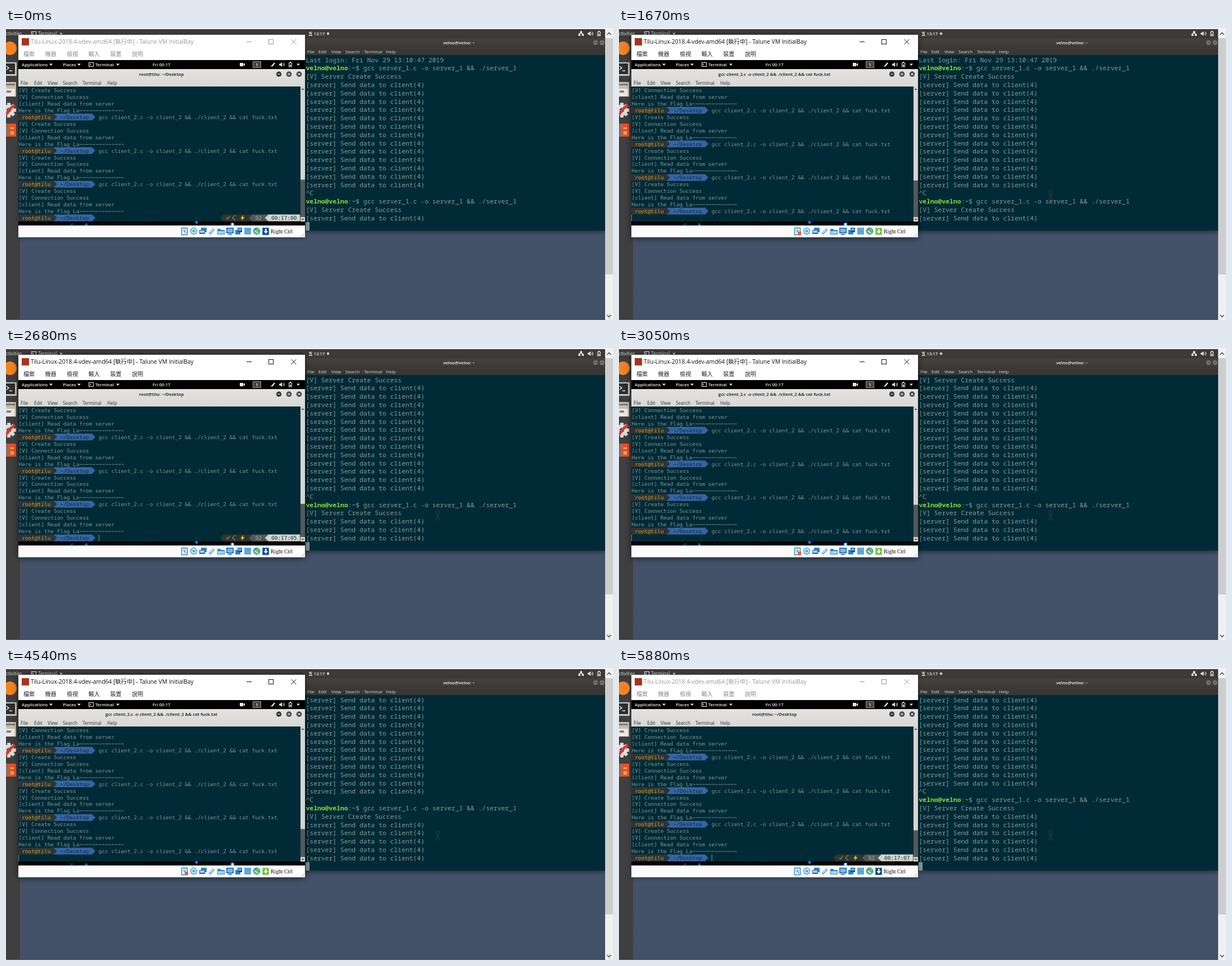
Animation, 1080 px wide and 519 px high, one loop 5.96 s. Source, as an HTML page with a canvas:

```html
<!DOCTYPE html>
<html lang="zh-Hant">
<head>
<meta charset="utf-8">
<title>Two terminals</title>
<style>
html, body { margin: 0; width: 100%; height: 100%; overflow: hidden; background: #435268; }
canvas { display: block; }
</style>
</head>
<body>
<canvas id="stage" width="1080" height="519"></canvas>
<script>
const c = document.getElementById('stage').getContext('2d');
const LOOP = 5960;
const SANS = '"Open Sans", "Noto Sans", "Noto Sans CJK TC", sans-serif';
const CJK = '"Open Sans", "Noto Sans CJK TC", "Noto Sans CJK", sans-serif';
const LEFT_MONO = '9.45px "DejaVu Sans Mono", monospace';
const RIGHT_MONO = '11.37px "Noto Sans Mono", monospace';
const COL = 5.69, ROW = 11.95, BASE = '#002b36', GREY = '#839496';
const COMMAND = 'gcc client_2.c -o client_2 && ./client_2 && cat fuck.txt';
const OUTPUT = ['[V] Create Success', '[V] Connection Success',
  '[client] Read data from server', 'Here is the Flag La~~~~~~~~~~~~~~'];
const SEND = '[server] Send data to client(4)';

// Each run: command recalled, title changed, enter pressed, server replied, prompt back, clock second.
const RUNS = [
  { up: 1270, title: 1590, enter: 1590, reply: 1900, done: 1980, sec: 4 },
  { up: 2130, title: 2360, enter: 2360, reply: 2450, done: 2560, sec: 5 },
  { up: 2760, title: 2900, enter: 2900, reply: 3210, done: 3290, sec: 5 },
  { up: 3370, title: 3680, enter: 3680, reply: 4000, done: 4080, sec: 6 },
  { up: 4160, title: 4310, enter: 4540, reply: 4680, done: 4780, sec: 7 }
];

function rect(x, y, w, h, color) { c.fillStyle = color; c.fillRect(x, y, w, h); }

function frame(x, y, w, h, color, width = 1) {
  c.strokeStyle = color; c.lineWidth = width; c.strokeRect(x, y, w, h);
}

function dot(x, y, r, color) {
  c.fillStyle = color; c.beginPath(); c.arc(x, y, r, 0, 7); c.fill();
}

function shape(color, ...p) {
  c.fillStyle = color; c.beginPath();
  for (let i = 0; i < p.length; i += 2) c.lineTo(p[i], p[i + 1]);
  c.fill();
}

function line(color, width, ...p) {
  c.strokeStyle = color; c.lineWidth = width; c.beginPath();
  for (let i = 0; i < p.length; i += 2) c.lineTo(p[i], p[i + 1]);
  c.stroke();
}

function text(s, x, y, font, color, align = 'left') {
  c.font = font; c.fillStyle = color; c.textAlign = align; c.fillText(s, x, y);
}

function fade(x, y, w, h, from, to) {
  const g = c.createLinearGradient(0, y, 0, y + h);
  g.addColorStop(0, from); g.addColorStop(1, to);
  rect(x, y, w, h, g);
}

function caret(x, y, color, s = 3) { shape(color, x - s, y - s / 2, x + s, y - s / 2, x, y + s / 2 + .5); }

function speaker(x, y) {
  shape('#eee', x - 5, y - 1.5, x - 3, y - 1.5, x, y - 4, x, y + 4, x - 3, y + 1.5, x - 5, y + 1.5);
  c.strokeStyle = '#eee'; c.lineWidth = 1;
  for (const r of [2.5, 4.5]) { c.beginPath(); c.arc(x, y, r, -.9, .9); c.stroke(); }
}

function battery(x, y) {
  frame(x - 2.5, y - 3, 5, 7, '#eee'); rect(x - 1, y - 5, 2, 2, '#eee'); rect(x - 1, y, 2, 3, '#eee');
}

function termIcon(x, y) {
  frame(x - 3.5, y - 3.5, 8, 7, '#eee'); line('#eee', 1, x - 2, y - 1.5, x, y, x - 2, y + 1.5);
}

function drawDesktop() {
  fade(0, 0, 1066, 519, '#46566c', '#425167');
  rect(0, 18, 25, 501, '#3f3f41');
  rect(0, 2, 1066, 17, '#3c3b38');
  rect(0, 0, 1080, 2, '#f4f4f4');
  text('ctivities', 0, 13, '8.2px ' + SANS, '#ddd');
  termIcon(49, 10);
  text('Terminal', 57, 13, '8.2px ' + SANS, '#ddd');
  caret(98, 10, '#ddd', 2.5);
  text('五 13:17', 538, 13, '600 7.6px ' + CJK, '#eee');
  dot(573, 10, 2.3, '#ccc');
  for (const [x, y] of [[1023, 7], [1020, 12], [1026, 12]]) rect(x - 1.5, y - 1.5, 3.5, 3.5, '#eee');
  line('#eee', 1, 1020, 11, 1020, 9.5, 1026, 9.5, 1026, 11);
  speaker(1040, 10); battery(1055, 10);
  drawDock();
}

function drawDock() {
  dot(7, 36, 12, '#f58220');
  rect(-2, 61, 21, 24, '#c9c9c7'); rect(-2, 63, 18, 19, '#2d2d2d');
  line('#fff', 1.4, 1, 68, 5, 71, 1, 74); line('#fff', 1.4, 6, 76, 11, 76);
  rect(-2, 96, 20, 26, '#c5beb3'); rect(-2, 99, 18, 3, '#83796e');
  rect(-2, 108, 18, 13, '#eeeae3'); rect(1, 111, 8, 4, '#8a8178');
  c.save(); c.translate(5, 146);
  for (let i = 0; i < 8; i++) { c.rotate(Math.PI / 4); rect(-3, -13, 6, 8, '#d9d9d9'); }
  c.restore();
  dot(5, 146, 10, '#dedede'); dot(5, 146, 4, '#5a5a5a');
  line('#d83b2f', 5, 0, 154, 9, 142, 16, 137);
  rect(-2, 170, 20, 23, '#e95420'); rect(-2, 171, 6, 21, '#777470');
  line('#fff', 1.2, 8, 178, 14, 178); line('#fff', 1.2, 8, 185, 14, 185); line('#fff', 1.2, 8, 188, 14, 188);
}

function drawPageBar() {
  rect(1066, 2, 14, 517, '#f0f0f0');
  rect(1066, 18, 14, 420, '#cdcdcd');
  line('#555', 1.6, 1069.5, 12, 1073, 8.5, 1076.5, 12);
  line('#555', 1.6, 1069.5, 510, 1073, 513.5, 1076.5, 510);
  rect(0, 518, 1066, 1, '#536176');
}

function serverPrompt(x, y) {
  const bold = 'bold ' + RIGHT_MONO, w = 6.823;
  text('velno@velno', x, y, bold, '#8ae234');
  text(':', x + 11 * w, y, RIGHT_MONO, GREY);
  text('~', x + 12 * w, y, bold, '#729fcf');
  text('$ gcc server_1.c -o server_1 && ./server_1', x + 13 * w, y, RIGHT_MONO, '#8b9a9b');
}

function drawServer(t) {
  const replies = RUNS.filter(r => t >= r.reply);
  c.save();
  c.shadowColor = 'rgba(0,0,0,.5)'; c.shadowBlur = 8; c.shadowOffsetY = 2;
  rect(528, 20, 538, 340, BASE);
  c.restore();
  fade(528, 18, 538, 18, '#44433f', '#3a3935');
  rect(528, 36, 538, 12, '#393834');
  text('velno@velno: ~', 806, 29, 'bold 7.5px ' + SANS, '#dfdbd2', 'center');
  for (const x of [1049, 1060.5]) { dot(x, 26, 4.2, '#777570'); line('#383733', 1, x - 2, 26, x + 2, 26); }
  const names = [['File', 536], ['Edit', 556], ['View', 579], ['Search', 604], ['Terminal', 637], ['Help', 676]];
  for (const [s, x] of names) text(s, x, 45, '8px ' + SANS, '#dfdbd2');

  const rows = ['Last login: Fri Nov 29 13:10:47 2019', null, '[V] Server Create Success',
    ...Array(13).fill(SEND), '^C', null, '[V] Server Create Success', ...Array(1 + replies.length).fill(SEND)];
  rows.slice(-20).forEach((s, i) => {
    const y = 60.6 + i * 14.8;
    if (s === null) serverPrompt(533.5, y);
    else text(s, 533.5, y, RIGHT_MONO, '#8b9a9b');
  });
  const since = replies.length ? replies[replies.length - 1].reply : -230;
  if (Math.floor((t - since) / 600) % 2 === 0) rect(533, 345, 7, 15, '#839496');
  if (t >= 410) drawGhost();
}

function drawGhost() {
  const color = '#26383e';
  frame(764.5, 290, 7, 4, color);
  line(color, 1.3, 763, 298, 773, 298);
  line(color, 1.3, 768, 294, 768, 305);
  line(color, 1.2, 764, 307, 766, 301); line(color, 1.2, 772, 307, 770, 301);
}

function drawFrame(active) {
  c.save();
  c.shadowColor = active ? 'rgba(0,0,0,.55)' : 'rgba(0,0,0,.3)';
  c.shadowBlur = active ? 11 : 7; c.shadowOffsetY = 2;
  rect(22, 12, 510, 360, '#fff');
  c.restore();
  const ink = active ? '#111' : '#999';
  rect(28, 18, 13, 13, '#a8341f');
  text('Tilu-Linux-2018.4-vdev-amd64 [執行中] - Talune VM InitialBay', 44, 28, '10.3px ' + CJK, ink);
  line(ink, 1, 428, 24.5, 437, 24.5);
  frame(467.5, 20.5, 8, 8, ink);
  line(ink, 1, 507.5, 20, 516.5, 29); line(ink, 1, 516.5, 20, 507.5, 29);
  ['檔案', '機器', '檢視', '輸入', '裝置', '說明'].forEach((s, i) =>
    text(s, 31 + i * 38.6, 50, '10px "Noto Sans CJK TC", "Noto Sans CJK", sans-serif', active ? '#222' : '#888'));
}

function drawPanel(title) {
  rect(22, 57, 510, 16, '#000');
  const font = '600 7.8px ' + SANS;
  text('Applications', 28, 68, font, '#eee'); caret(80, 65, '#eee');
  text('Places', 101, 68, font, '#eee'); caret(130, 65, '#eee');
  termIcon(151, 65);
  text('Terminal', 159, 68, font, '#eee'); caret(199, 65, '#eee');
  text('Fri 00:17', 276.5, 68, font, '#eee', 'center');
  rect(416, 62, 6, 6, '#eee'); shape('#eee', 422, 65, 425, 62, 425, 68);
  rect(439, 59, 15, 12, '#444'); frame(439.5, 59.5, 14, 11, '#999');
  text('1', 446.5, 68, font, '#fff', 'center');
  line('#eee', 2.2, 473, 68, 478, 62); line('#eee', 1, 471, 69, 473, 67);
  speaker(491, 65); battery(506, 65); caret(520, 65, '#eee');

  fade(22, 73, 510, 31, '#e3e2e0', '#dad8d5');
  text(title, 276.5, 85, 'bold 7.7px ' + SANS, '#303436', 'center');
  [485.5, 503.5, 521.5].forEach((x, i) => {
    dot(x, 82, 4.7, '#34383a');
    if (i === 0) line('#eee', 1.2, x - 2, 82, x + 2, 82);
    if (i === 1) frame(x - 1.5, 80.5, 3, 3, '#eee');
    if (i === 2) { line('#eee', 1.1, x - 2, 80, x + 2, 84); line('#eee', 1.1, x + 2, 80, x - 2, 84); }
  });
  const names = [['File', 26], ['Edit', 50], ['View', 74], ['Search', 101], ['Terminal', 136], ['Help', 180]];
  for (const [s, x] of names) text(s, x, 101, '8.3px ' + SANS, '#303436');
}

const col = n => 22.5 + n * COL;

function clientPrompt(y, command) {
  const top = y - 9.6, mid = top + ROW / 2, end = top + ROW;
  rect(22, top, col(11) - 22, ROW, '#2e3436');
  rect(col(11), top, col(23) - col(11), ROW, '#3465a4');
  shape('#2e3436', col(11) - .5, top, col(12), mid, col(11) - .5, end);
  shape('#3465a4', col(23) - .5, top, col(24), mid, col(23) - .5, end);
  text('root@tilu', col(1), y, LEFT_MONO, '#d0a020');
  text('~/Desktop', col(13), y, LEFT_MONO, '#16283c');
  if (command) text(COMMAND, col(25), y, LEFT_MONO, GREY);
}

function statusPrompt(y, sec) {
  const top = y - 9.6, mid = top + ROW / 2, end = top + ROW;
  const segment = (from, to, color) => {
    rect(col(from), top, col(to) - col(from), ROW, color);
    shape(color, col(from) + .5, top, col(from - 1), mid, col(from) + .5, end);
  };
  segment(64, 73, '#2e3436'); segment(73, 78, '#555753'); segment(78, 88, '#d3d7cf');
  line('#8f9a20', 1.3, 392, mid, 394, mid + 2, 398, mid - 3);
  line('#b58a20', 1.1, 408, top + 1, 403, mid, 408, end - 1);
  shape('#f4c20d', 422, mid - 5, 417, mid + 1, 420.5, mid + 1, 419, mid + 5, 425, mid - 1, 421.5, mid - 1);
  text('92', col(74), y, LEFT_MONO, '#a9ada6');
  text('00:17:0' + sec, col(79), y, LEFT_MONO, '#22282a');
}

function drawClient(t, running, typed, finished) {
  rect(22, 104, 502, 240, BASE);
  const shift = running ? 1 : 0;
  for (let i = 0; i < 20 - shift; i++) {
    const y = 114 + i * ROW, part = (i + shift) % 5, last = i + shift === 19;
    if (part === 4) clientPrompt(y, !last || running || typed);
    else text(OUTPUT[part], 22.5, y, LEFT_MONO, GREY);
  }
  const bottom = 114 + 19 * ROW, prev = RUNS[finished - 1];
  if (!running && !typed) statusPrompt(bottom, prev ? prev.sec : 0);
  const blinkOn = prev ? Math.floor((t - prev.reply) / 600) % 2 === 0 : t > 410;
  if (running) rect(22, bottom - 9, 1, 11, '#6f8587');
  else if (typed) rect(col(81), bottom - 9, 1, 11, '#93a1a1');
  else if (blinkOn) rect(col(25), bottom - 9, 1, 11, '#93a1a1');

  rect(524, 104, 8, 240, '#d6d4d1');
  shape('#555', 525.5, 110, 530.5, 110, 528, 107);
  shape('#555', 525.5, 339, 530.5, 339, 528, 342);
  const top = 269.5 + finished * 3.8 + (running ? 1.5 : 0);
  rect(524, top, 8, 336 - top, '#55585a');
}

function drawWallpaper() {
  rect(22, 344, 510, 7, '#020406');
  for (let i = 0; i < 26; i++) rect(168 + i * 3.3, 345 + (i * 7 % 5), 2, 1, '#0c1c26');
  shape('#1769b8', 140, 351, 143, 346, 146, 351);
  shape('#174c78', 112, 350, 118, 347, 120, 350);
  dot(339, 345.5, 2.4, '#1684d8');
  dot(403, 349, 3.6, '#1c78cc'); dot(403, 349, 2, '#e5f5ff');
}

function drawStatus(busy, captured) {
  rect(22, 351, 510, 21, '#fcfcfc');
  const y = 361, blue = '#2f86cf', pale = '#a8d4f4';
  frame(312.5, 355.5, 10, 12, blue, 1.5); dot(317.5, 360, 3, pale);
  line(blue, 1.3, 317, 360, 320, 365);
  if (busy) rect(318, 362, 6, 6, '#e2633d');
  dot(334, y, 6.3, '#4ca3dc'); dot(334, y, 5, '#b9def5'); dot(334, y, 1.8, '#3b84bb');
  rect(347, 355, 10, 8, blue); rect(344, 359, 10, 7, '#1d5da0'); rect(345, 360, 8, 4, pale);
  line('#6eaed6', 4.5, 362, 366, 370, 357); line('#e1f2fc', 1.5, 363, 364, 369, 357);
  shape(blue, 376, 357, 381, 357, 383, 359, 389, 359, 389, 367, 376, 367); rect(377, 361, 11, 5, pale);
  rect(392, 355, 13, 10, '#2262a5'); rect(393.5, 356.5, 10, 7, '#76b9ec'); rect(395, 366, 7, 1.5, '#2262a5');
  rect(408, 359, 9, 8, blue); rect(412, 355, 8, 8, '#1b589b'); rect(413, 356, 6, 4, '#65aee5');
  rect(424, 355, 12, 12, '#5fa7d9');
  dot(446, y, 6.5, '#3f91d0'); shape('#72c33d', 441, 365, 447, 355, 452, 358, 446, 367);
  line('#fff', 1.2, 442, 360, 449, 365);
  rect(456, 355, 12, 13, captured ? '#71bd45' : '#164f88');
  frame(456.5, 355.5, 11, 12, captured ? '#a2d982' : '#276fae');
  rect(461, 357, 2.5, 4, '#fff'); shape('#fff', 458.5, 361, 466, 361, 462.2, 365.5);
  text('Right Ctrl', 471, 365, '9.7px "Liberation Serif", serif', '#111');
  for (let i = 0; i < 3; i++) for (let j = 0; j <= i; j++) rect(529 - j * 2.5, 365 + i * 2.3, 1.2, 1.2, '#aaa');
}

function draw(t) {
  const within = (from, to) => RUNS.some(r => t >= r[from] && t < r[to]);
  const running = within('enter', 'done'), typed = within('up', 'enter');
  const finished = RUNS.filter(r => t >= r.done).length;
  drawDesktop();
  drawServer(t);
  drawFrame(t >= 650 && t < 5800);
  drawPanel(within('title', 'done') ? COMMAND : 'root@tilu: ~/Desktop');
  drawClient(t, running, typed, finished);
  drawWallpaper();
  drawStatus(running, running || (t >= 970 && t < 1270));
  drawPageBar();
}

const start = performance.now();
function tick() {
  draw((performance.now() - start) % LOOP);
  requestAnimationFrame(tick);
}
tick();
</script>
</body>
</html>
```
